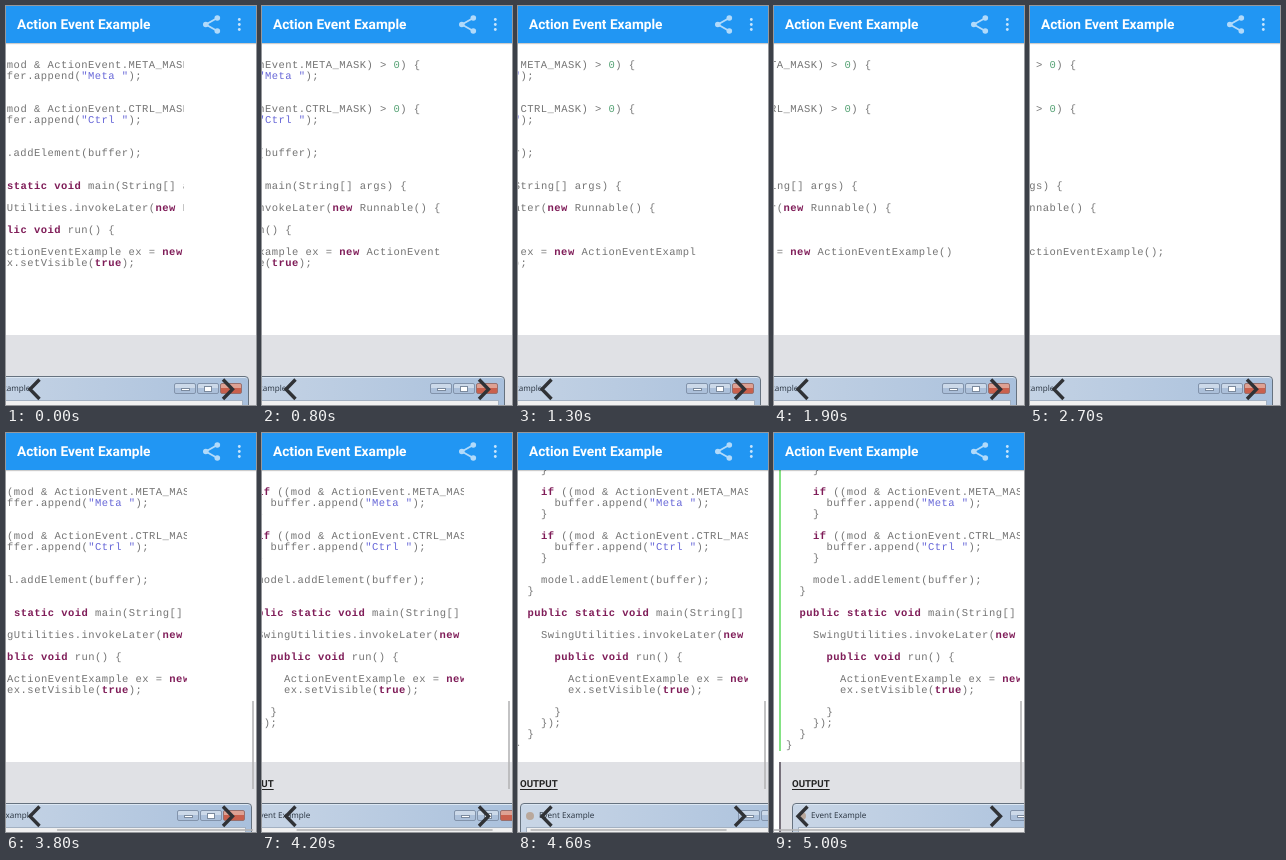
An HTML page for the animation above (5100 ms loop, 250 by 399 pixels).

```html
<!DOCTYPE html>
<html lang="en">
<head>
<meta charset="utf-8">
<title>Action Event Example</title>
<style>
html, body { margin: 0; width: 100%; height: 100%; overflow: hidden; background: #fff; }
#stage { position: relative; width: 250px; height: 399px; overflow: hidden; background: #fff; text-rendering: geometricPrecision; }
#stage div, pre, svg { position: absolute; box-sizing: border-box; }
#page { left: 0; top: 0; width: 318px; height: 399px; }
#code { left: 5px; top: 0; width: 241px; height: 318px; overflow: hidden; border-left: 2px solid #84e284; }
pre { margin: 0; left: 5px; top: 33px; font: 10.5px/11px "Liberation Mono", monospace; letter-spacing: .46px; color: #747474; }
.key { color: #7f1c58; font-weight: bold; }
.str { color: #6868d8; }
.num { color: #55a274; }
#output { left: 5px; top: 329px; width: 320px; height: 70px; background: #e0e1e5; border-left: 2px solid #76707a; }
#label { left: 18px; top: 346px; font: bold 9.7px/12px Roboto, sans-serif; color: #222; text-decoration: underline; text-underline-offset: 2px; }
#window { left: 18px; top: 370px; width: 293px; height: 40px; border: 1px solid #66727f; border-radius: 4px 4px 0 0; background: linear-gradient(90deg, #c9d6e6, #a9c0dc); box-shadow: inset 0 1px #dce7f3; }
#window .name { left: 18px; top: 6px; font: 8.1px/12px "Open Sans", sans-serif; color: #26303c; white-space: nowrap; }
#window .icon { left: 5px; top: 8px; width: 8px; height: 8px; border-radius: 50%; background: #b9a89c; }
#window .client { left: 5px; top: 23px; width: 281px; height: 20px; background: #f0f0f0; border: 1px solid #a3b1c2; }
#window .btn { top: 6px; width: 22px; height: 11px; border: 1px solid #8293ab; border-radius: 2px; background: linear-gradient(#ccd9e9 45%, #acc0da 50%); }
#window .btn i { position: absolute; box-sizing: border-box; border: 1px solid #7b8a9e; background: #fff; }
#window .close { background: linear-gradient(#dea193 45%, #c9604d 50%); border-color: #98706e; }
#bar { left: 0; top: 0; width: 250px; height: 37px; background: #2196f3; color: #fff; box-shadow: 0 1px 1px rgba(0, 0, 0, .2); }
#bar span { position: absolute; left: 11px; top: 9px; font: 600 13.7px/20px Roboto, sans-serif; white-space: nowrap; }
#bar svg, #arrows { left: 0; top: 0; }
.thumb { background: #b4b4b6; opacity: .8; }
#thumbX { left: 0; top: 396px; width: 196px; height: 2px; }
#thumbY { left: 246px; top: 268px; width: 2px; height: 88px; }
</style>
</head>
<body>
<div id="stage">
  <div id="page">
    <div id="code"><pre id="text"></pre></div>
    <div id="output"></div>
    <div id="label">OUTPUT</div>
    <div id="window">
      <div class="icon"></div>
      <div class="name">Event Example</div>
      <div class="btn" style="left:217px"><i style="left:6px;top:4px;width:9px;height:3px"></i></div>
      <div class="btn" style="left:240px"><i style="left:6px;top:2px;width:8px;height:6px"></i></div>
      <div class="btn close" style="left:263px"></div>
      <div class="client"></div>
    </div>
  </div>
  <div id="thumbX" class="thumb"></div>
  <div id="thumbY" class="thumb"></div>
  <svg id="arrows" width="250" height="399" fill="none" stroke="#303236" stroke-width="3.4">
    <path d="M33.5 373.5L24 383.3L33.5 393M217 373.5L226.5 383.3L217 393"/>
  </svg>
  <div id="bar">
    <span>Action Event Example</span>
    <svg width="250" height="37" fill="#fff">
      <g opacity=".65">
        <path d="M211.3 12L199.8 18.5L211.3 25" fill="none" stroke="#fff" stroke-width="1.8"/>
        <circle cx="211.3" cy="12" r="2.8"/><circle cx="199.8" cy="18.5" r="2.8"/><circle cx="211.3" cy="25" r="2.8"/>
      </g>
      <g opacity=".75">
        <circle cx="233.3" cy="13.5" r="1.4"/><circle cx="233.3" cy="18.5" r="1.4"/><circle cx="233.3" cy="23.5" r="1.4"/>
      </g>
    </svg>
  </div>
</div>
<script>
const source = `    }

    if ((mod & ActionEvent.META_MASK) > 0) {
      buffer.append("Meta ");
    }

    if ((mod & ActionEvent.CTRL_MASK) > 0) {
      buffer.append("Ctrl ");
    }

    model.addElement(buffer);
  }

  public static void main(String[] args) {

    SwingUtilities.invokeLater(new Runnable() {

      public void run() {

        ActionEventExample ex = new ActionEventExample();
        ex.setVisible(true);

      }
    });
  }
}`;

const $ = id => document.getElementById(id);
const token = /(".*?")|\b(if|public|static|void|new|true)\b|\b(\d+)\b/g;

$('text').innerHTML = source
  .replace(/&/g, '&amp;').replace(/>/g, '&gt;')
  .replace(token, (m, str, key) =>
    `<span class=${str ? 'str' : key ? 'key' : 'num'}>${m}</span>`);

// [time in ms, offset in px]
const codeSteps = [[0, -4], [100, -11], [800, -83], [1200, -118], [1400, -130], [1500, -130],
  [1600, -132], [1700, -132], [1800, -136], [1900, -144], [2100, -164], [2400, -185],
  [2700, -195], [2800, -196], [2900, -190], [3000, -165], [3300, -67], [3400, -29], [3500, 0]];
const pageSteps = [[3700, -68], [3800, -65], [4200, -44], [4700, -9], [4900, -1], [5000, 0]];

function valueAt(steps, t) {
  if (t <= steps[0][0]) return steps[0][1];
  for (let i = 1; i < steps.length; i++) {
    const [t0, v0] = steps[i - 1], [t1, v1] = steps[i];
    if (t <= t1) return v0 + (v1 - v0) * (t - t0) / (t1 - t0);
  }
  return steps[steps.length - 1][1];
}

const LOOP = 5100, TICK = 100;
const start = performance.now();
const moveX = (id, x) => { $(id).style.transform = `translateX(${x}px)`; };

function draw() {
  const elapsed = (performance.now() - start) % LOOP;
  const t = Math.floor(elapsed / TICK) * TICK;
  const page = Math.round(valueAt(pageSteps, t));
  moveX('text', Math.round(valueAt(codeSteps, t)));
  moveX('page', page);
  moveX('thumbX', -page * 250 / 318);
  const shown = t >= 3800 ? 'visible' : 'hidden';
  $('thumbX').style.visibility = $('thumbY').style.visibility = shown;
  requestAnimationFrame(draw);
}
draw();
</script>
</body>
</html>
```
